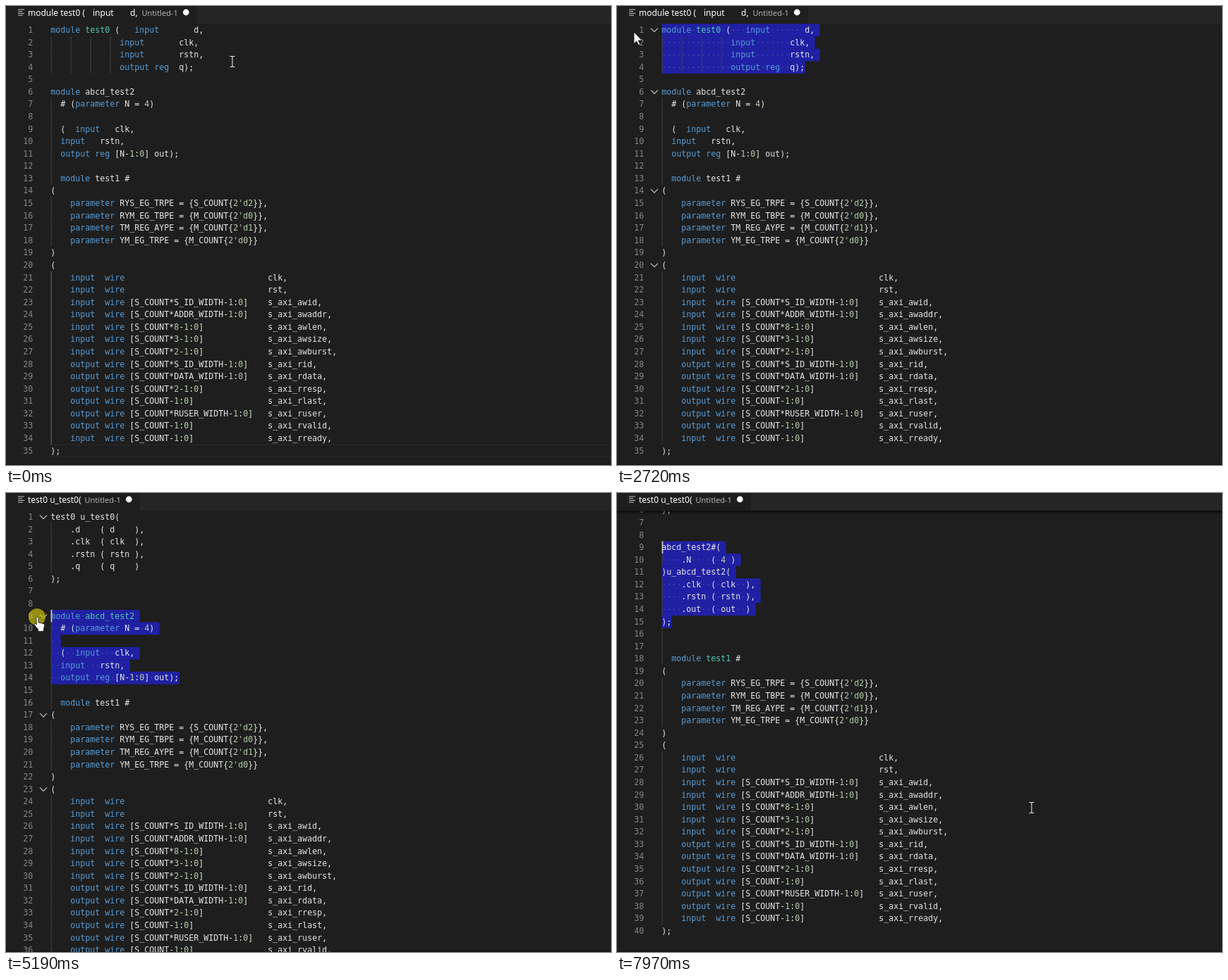
Animation of 858 by 652 pixels, one loop 8 s. Source, as an HTML page with a canvas:

```html
<!DOCTYPE html>
<html lang="ko">
<head>
<meta charset="utf-8">
<style>
html, body { margin: 0; width: 100%; height: 100%; overflow: hidden; background: #1e1e1e; }
canvas { display: block; }
</style>
</head>
<body>
<canvas id="stage" width="858" height="652"></canvas>
<script>
const ctx = document.getElementById('stage').getContext('2d');
const LOOP = 8000, LEFT = 63.2, CHAR = 7, TOP = 25.3, ROW = 17.575;
const MONO = '11.63px "DejaVu Sans Mono", monospace';
const ui = size => `${size}px "Noto Sans", "Noto Sans CJK KR", sans-serif`;

// ---- documents ----
const port = (dir, width, name) =>
  ('    ' + dir.padEnd(7) + 'wire ' + (width && `[${width}-1:0]`)).padEnd(44) + name + ',';
const pin = (name, value, end = ',') => `    .${name.padEnd(5)}( ${value.padEnd(5)})${end}`;

const source = [
  'module test0 (   input       d,',
  '              input       clk,',
  '              input       rstn,',
  '              output reg  q);',
  '',
  'module abcd_test2',
  '  # (parameter N = 4)',
  ' ',
  '  (  input   clk,',
  '  input   rstn,',
  '  output reg [N-1:0] out);',
  '',
  '  module test1 #',
  '(',
  "    parameter RYS_EG_TRPE = {S_COUNT{2'd2}},",
  "    parameter RYM_EG_TBPE = {M_COUNT{2'd0}},",
  "    parameter TM_REG_AYPE = {M_COUNT{2'd1}},",
  "    parameter YM_EG_TRPE = {M_COUNT{2'd0}}",
  ')',
  '(',
  port('input', '', 'clk'),
  port('input', '', 'rst'),
  port('input', 'S_COUNT*S_ID_WIDTH', 's_axi_awid'),
  port('input', 'S_COUNT*ADDR_WIDTH', 's_axi_awaddr'),
  port('input', 'S_COUNT*8', 's_axi_awlen'),
  port('input', 'S_COUNT*3', 's_axi_awsize'),
  port('input', 'S_COUNT*2', 's_axi_awburst'),
  port('output', 'S_COUNT*S_ID_WIDTH', 's_axi_rid'),
  port('output', 'S_COUNT*DATA_WIDTH', 's_axi_rdata'),
  port('output', 'S_COUNT*2', 's_axi_rresp'),
  port('output', 'S_COUNT', 's_axi_rlast'),
  port('output', 'S_COUNT*RUSER_WIDTH', 's_axi_ruser'),
  port('output', 'S_COUNT', 's_axi_rvalid'),
  port('input', 'S_COUNT', 's_axi_rready'),
  ');'
];
const inst0 = ['test0 u_test0(', pin('d', 'd'), pin('clk', 'clk'), pin('rstn', 'rstn'), pin('q', 'q', ''), ');', '', ''];
const inst1 = ['abcd_test2#(', '    .N    ( 4 )', ')u_abcd_test2(',
  pin('clk', 'clk'), pin('rstn', 'rstn'), pin('out', 'out', ''), ');', '', ''];
const docs = [
  { lines: source, type: 'test0', folds: [1, 6, 14, 20] },
  { lines: [...inst0, ...source.slice(5)], type: 'abcd_test2', folds: [1, 9, 17, 23] },
  { lines: [...inst0, ...inst1, ...source.slice(12)], type: 'test1', folds: [] }
];

// ---- timeline ----
const path = [
  [0, 321, 79], [150, 321, 79], [370, 315, 95], [530, 315, 95], [600, 300, 89], [1140, 27, 40],
  [1230, 27, 40], [1380, 24, 37], [3180, 24, 37], [3790, 232.5, 308], [4030, 232.5, 308],
  [4330, 262, 264], [4410, 262, 264], [4870, 70, 190], [5190, 44, 176], [5270, 44, 176],
  [5720, 87, 157], [7110, 87, 157], [7590, 690, 430], [7670, 690, 430], [7970, 588, 447], [8000, 588, 447]
];
const between = (t, a, b) => t >= a && t < b;
const ramp = (t, a, b) => Math.min(1, Math.max(0, (t - a) / (b - a)));

function pointerAt(t) {
  const i = path.findIndex(k => k[0] > t);
  const [t0, x0, y0] = path[i - 1], [t1, x1, y1] = path[i];
  const k = ramp(t, t0, t1), eased = k * k * (3 - 2 * k);
  return { x: x0 + (x1 - x0) * eased, y: y0 + (y1 - y0) * eased };
}

// Selection runs from the head (caret) down to the anchor.
function selectionAt(t, pointer, doc) {
  const drag = (row, release) => {
    const p = t < release ? pointer : { x: 0, y: 0 };
    const first = row === 4 ? 1 : 9;
    const head = Math.min(row, Math.max(first, Math.floor((p.y - TOP) / ROW) + 1));
    const size = doc.lines[head - 1].length;
    const col = Math.min(size, Math.max(0, Math.round((p.x - LEFT) / CHAR)));
    return { head, col, row, end: doc.lines[row - 1].length };
  };
  if (t < 600) return null;
  if (t < 2790) return drag(4, 1200);
  if (t < 4330) return { head: 1, col: 0, row: 6, end: 2 };
  if (t < 6560) return drag(14, 5200);
  return { head: 9, col: 0, row: 15, end: 2 };
}

// ---- drawing helpers ----
function rect(x, y, w, h, color, radius = 0) {
  ctx.fillStyle = color;
  ctx.beginPath();
  ctx.roundRect(x, y, w, h, radius);
  ctx.fill();
}
function text(str, x, y, color, font, align = 'left') {
  ctx.font = font;
  ctx.fillStyle = color;
  ctx.textAlign = align;
  ctx.fillText(str, x, y);
}
function shape(d, fill, stroke, width = 1) {
  const p = new Path2D(d);
  if (fill) { ctx.fillStyle = fill; ctx.fill(p); }
  if (stroke) { ctx.strokeStyle = stroke; ctx.lineWidth = width; ctx.stroke(p); }
}
const rowTop = n => TOP + (n - 1) * ROW;

function drawCode(line, y, type) {
  const token = /\b(?:module|parameter|input|output|reg|wire)\b|\d+'d\d+|\b\d+\b|\w+|[^\w\s]+/g;
  let previous = '';
  for (const { 0: word, index } of line.matchAll(token)) {
    let color = '#e6e6e6';
    if (/^(module|parameter|input|output|reg|wire)$/.test(word)) color = '#569cd6';
    else if (/^\d/.test(word)) color = '#b5cea8';
    else if (previous === 'module' && word === type) color = '#4ec9b0';
    text(word, LEFT + index * CHAR, y, color, MONO);
    previous = word;
  }
}

const indent = line => line.search(/\S/);
function guideCount(lines, i) {
  if (indent(lines[i]) >= 0) return Math.ceil(indent(lines[i]) / 4);
  let a = i, b = i;
  while (indent(lines[a]) < 0) a--;
  while (indent(lines[b]) < 0) b++;
  const above = indent(lines[a]), below = indent(lines[b]);
  return above < below ? 1 + Math.floor(above / 4) : Math.ceil(below / 4);
}

function drawSelection(sel, lines, color) {
  for (let r = sel.head; r <= sel.row; r++) {
    const from = r === sel.head ? sel.col : 0;
    const to = r === sel.row ? sel.end : lines[r - 1].length + 1;
    rect(LEFT + .5 + from * CHAR, rowTop(r), (to - from) * CHAR, ROW + .3, color, [0, 2.5, 2.5, 0]);
    for (let c = from; c < Math.min(to, lines[r - 1].length); c++)
      if (lines[r - 1][c] === ' ')
        rect(LEFT + c * CHAR + 3, rowTop(r) + 8.4, 1.2, 1.2, 'rgba(227,228,226,.35)');
  }
}

function drawEditor(t, doc, sel, paletteOpen) {
  const { lines } = doc;
  const scroll = t >= 7740 ? 97.5 : t >= 7500 ? 48.75 : 0;
  ctx.save();
  ctx.beginPath();
  ctx.rect(0, 25, 858, 627);
  ctx.clip();
  ctx.translate(0, -scroll);
  if (!sel) {
    rect(63, rowTop(35), 795, 1, '#2a2a2a');
    rect(63, rowTop(36) - 1, 795, 1, '#2a2a2a');
  } else drawSelection(sel, lines, paletteOpen ? '#3a3d41' : '#2020a4');

  const foldAlpha = t < 2900 ? ramp(t, 1140, 1380)
    : t < 4500 ? 1 - ramp(t, 3350, 3850)
    : ramp(t, 4900, 5150) * (1 - ramp(t, 5400, 5880));
  lines.forEach((line, i) => {
    const n = i + 1, y = rowTop(n);
    for (let g = 0; g < guideCount(lines, i); g++)
      rect(64 + g * 28 - .4, y, 1, ROW, !sel && n > 20 ? '#707070' : '#404040');
    drawCode(line, y + 12.7, doc.type);
    text(n, 38.3, y + 12.7, '#858585', MONO, 'right');
  });
  ctx.globalAlpha = foldAlpha;
  for (const n of doc.folds) {
    const row = n === 1 && between(t, 2790, 2950) ? 2 : n;
    shape(`M48 ${rowTop(row) + 6.4}l5 5 5-5`, null, '#c5c5c5', 1.2);
  }
  ctx.globalAlpha = 1;

  const reset = t < 2790 ? 1020 : t < 4330 ? 2790 : t < 6560 ? 5190 : 6525;
  const caretOn = Math.floor(Math.max(0, t - reset) / 500) % 2 === 0;
  if (sel && caretOn && !paletteOpen)
    rect(LEFT + .4 + sel.col * CHAR, rowTop(sel.head), 1.8, ROW, '#c8c8c4');
  ctx.restore();

  if (scroll) {
    const shade = ctx.createLinearGradient(0, 25, 0, 31);
    shade.addColorStop(0, 'rgba(0,0,0,.6)');
    shade.addColorStop(1, 'rgba(0,0,0,0)');
    rect(0, 25, 858, 6, shade);
  }
}

function drawTab(first) {
  const right = first ? 271 : 190, font = ui(12);
  rect(0, 0, 858, 25, '#252526');
  rect(0, 0, right, 25, '#1e1e1e');
  [9, 6, 9, 7].forEach((w, i) => rect(17, 4.5 + i * 2.7, w, 1, '#c5c5c5'));
  if (first) {
    text('module test0 (', 31, 14, '#fff', font);
    text('input', 123, 14, '#fff', font);
    text('d,', 176, 14, '#fff', font);
  } else text('test0 u_test0(', 31, 14, '#fff', font);
  text('Untitled-1', first ? 192.5 : 111.5, 13.5, '#b4b4b4', ui(11));
  ctx.beginPath();
  ctx.arc(right - 15.7, 9, 4.4, 0, 7);
  ctx.fillStyle = '#fff';
  ctx.fill();
}

// ---- command palette ----
const commands = [
  [40, 'Verilog Utils - Instation'],
  [61, 'Sync: 다운로드 설정', 'Sync: Download Settings', '<Shift>+<Alt>+D'],
  [104, '표시 언어 구성', 'Configure Display Language'],
  [148, '<Tab> 키로 포커스 이동 설정/해제', 'Toggle Tab Key Moves Focus', 'Ctrl+M', 687],
  [190, '가리키기 표시', 'Show Hover', 'Ctrl+K Ctrl+I'],
  [233, '개발자: 강제로 다시 토큰화', 'Developer: Force Retokenize'],
  [276, '개발자: 개발자 도구 설정/해제', '', 'Ctrl+<Shift>+I']
];
// Hangul is set a little larger than the Latin text beside it.
function label(str, x, y, color) {
  for (const part of str.match(/[가-힣]+|[^가-힣]+/g)) {
    text(part, x, y, color, ui(/[가-힣]/.test(part) ? 13.3 : 12));
    x += ctx.measureText(part).width;
  }
}
function drawKeys(keys, right, y) {
  for (const part of keys.match(/\+| |[^+ ]+/g).reverse()) {
    ctx.font = ui(10.5);
    const isKey = !/[+ ]/.test(part);
    const w = isKey ? ctx.measureText(part).width + 12 : part === '+' ? 13 : 9;
    if (isKey) rect(right - w, y - 8, w, 16.5, '#373738', 3);
    text(part, right - w / 2, y + 3.8, '#ddd', ui(10.5), 'center');
    right -= w;
  }
}
function drawPalette() {
  ctx.save();
  ctx.shadowColor = '#000';
  ctx.shadowBlur = 9;
  ctx.shadowOffsetY = 3;
  rect(182.5, -6, 585.5, 299, '#252526');
  ctx.restore();
  rect(188, -4, 574.5, 27, '#0b4f7d');
  rect(189, -4, 572.5, 26, '#3c3c3c');
  text('>', 193.5, 16, '#ccc', ui(12));
  rect(202, 3, 1, 16, '#ddd');
  rect(182.5, 29.5, 585.5, 21.5, '#062f4a');
  rect(758, 29.5, 10, 19, 'rgba(121,121,121,.4)');
  rect(182.5, 137, 585.5, 1, '#3f3f46');
  for (const [y, title, detail, keys, right = 750] of commands) {
    label(title, 193.5, y + 4.5, y === 40 ? '#fff' : '#dcdcdc');
    if (detail) label(detail, 193.5, y + 25, '#a4a4a4');
    if (keys) drawKeys(keys, right, y + .5);
  }
  label('최근에 사용한 항목', 642.5, 44.5, '#3794ff');
  label('기타 명령', 697, 152.5, '#3794ff');
}

function drawPointer(t, { x, y }) {
  if (between(t, 600, 1290) || between(t, 4330, 5330)) {
    ctx.beginPath();
    ctx.arc(x, y, 12, 0, 7);
    ctx.fillStyle = 'rgba(200,190,10,.7)';
    ctx.fill();
  }
  ctx.save();
  ctx.translate(x, y);
  if (x > 62)
    shape('M-3.5-7.5h2.5l1 1 1-1h2.5M-3.5 7.5h2.5l1-1 1 1h2.5M0-6.5v13', null, '#e4e4e4', 1.1);
  else if (x > 40)
    shape('M-1 1q1.6-1.8 3 0v7l7 1.6q2 .6 1.6 3l-1.2 5v3h-8v-3l-5-6q-1-2 1-2.2l2 1.6z', '#fff', '#111', .8);
  else
    shape('M0 0v16.5l3.8-3.6 2.5 5.6 2.5-1.1-2.5-5.4h5.2z', '#fff', '#111', .8);
  ctx.restore();
}

function draw(now) {
  const t = now % LOOP;
  const doc = docs[t < 2790 ? 0 : t < 6560 ? 1 : 2];
  const paletteOpen = between(t, 2250, 2720) || between(t, 6030, 6490);
  const pointer = pointerAt(t);
  rect(0, 0, 858, 652, '#1e1e1e');
  rect(0, 650, 858, 2, '#171717');
  drawEditor(t, doc, selectionAt(t, pointer, doc), paletteOpen);
  drawTab(doc === docs[0]);
  if (paletteOpen) drawPalette();
  drawPointer(t, pointer);
}

const start = performance.now();
function tick() {
  draw(performance.now() - start);
  requestAnimationFrame(tick);
}
tick();
</script>
</body>
</html>
```
